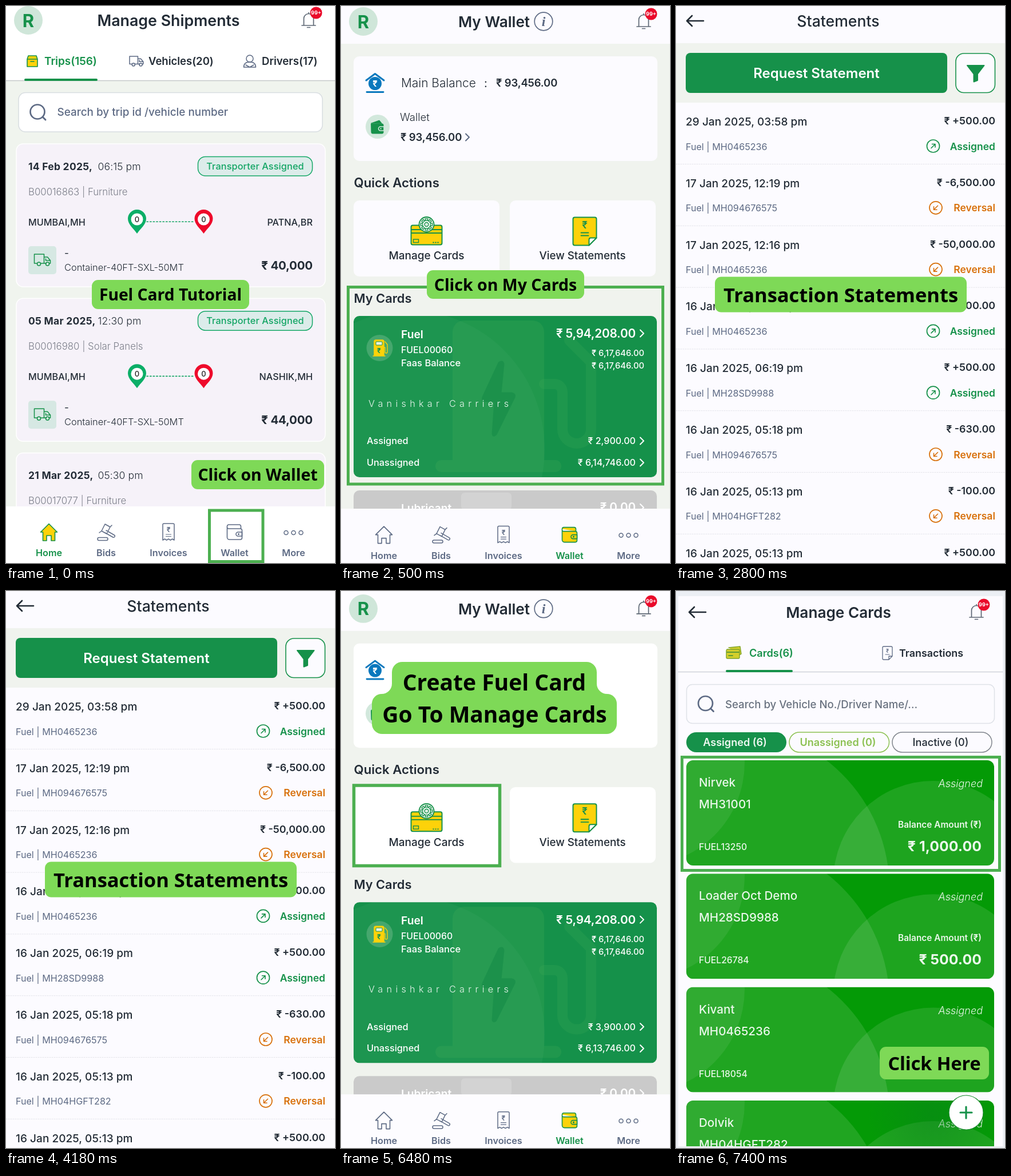
Write an HTML page that moves like this. It is 575 px wide and 974 px high and loops after 8000 ms.

```html
<!DOCTYPE html>
<html lang="en">
<head>
<meta charset="utf-8">
<title>Fuel card tutorial</title>
<style>
  html, body { margin: 0; width: 100%; height: 100%; overflow: hidden; background: #fff; }
  svg { display: block; width: 575px; height: 974px; font-family: Inter, sans-serif; }
  .scene { opacity: 0; }
  .tag { font-family: "Noto Sans", sans-serif; font-weight: 700; }
</style>
</head>
<body>
<svg id="stage" viewBox="0 0 575 974" xmlns="http://www.w3.org/2000/svg"></svg>
<script>
const INK = '#232c36', GREEN = '#16914a', SLATE = '#5d6a84', LIME = '#7ed957';
const FRAME = '#4caf50', SAND = '#f0f3ee', PAPER = '#fcfbff', YELLOW = '#fdd20a';

// Drawing helpers: each returns SVG markup.
const text = (x, y, s, size, weight = 400, fill = INK, anchor = 'start', gap = 0, more = '') =>
  `<text x="${x}" y="${y}" font-size="${size}" font-weight="${weight}" fill="${fill}" text-anchor="${anchor}" letter-spacing="${gap}" ${more}>${s}</text>`;
const mid = (x, y, s, size, weight, fill, gap) => text(x, y, s, size, weight, fill, 'middle', gap);
const end = (x, y, s, size, weight, fill, gap) => text(x, y, s, size, weight, fill, 'end', gap);
const box = (x, y, w, h, r, fill, stroke = 'none', sw = 1.5) =>
  `<rect x="${x}" y="${y}" width="${w}" height="${h}" rx="${r}" fill="${fill}" stroke="${stroke}" stroke-width="${sw}"/>`;
const dot = (x, y, r, fill, stroke = 'none', sw = 1.5) =>
  `<circle cx="${x}" cy="${y}" r="${r}" fill="${fill}" stroke="${stroke}" stroke-width="${sw}"/>`;
const line = (d, stroke, sw = 1.5, fill = 'none', more = '') =>
  `<path d="${d}" fill="${fill}" stroke="${stroke}" stroke-width="${sw}" stroke-linejoin="round" stroke-linecap="round" ${more}/>`;
const group = (t, ...kids) => `<g transform="${t}">${kids.join('')}</g>`;
const move = (x, y, ...kids) => group(`translate(${x} ${y})`, ...kids);
const tagText = (x, y, s, size) => `<text class="tag" x="${x}" y="${y}" font-size="${size}" text-anchor="middle">${s}</text>`;
const tag = (x, y, w, h, s, size, base) => box(x, y, w, h, 11, LIME) + tagText(x + w / 2, base, s, size);
const outline = (x, y, w, h, sw) => box(x, y, w, h, 0, 'none', FRAME, sw);
const chevron = (x, y, color, h = 6) => line(`M${x} ${y - h}l${h} ${h}l${-h} ${h}`, color, 2);

// Shared icons
const avatar = y => dot(39, y, 25, '#cfe6d9') + mid(39, y + 11.5, 'R', 31, 700, GREEN);
const bell = (x, y) => move(x, y,
  line('M-8.5 8V-3a8.5 8.5 0 0 1 17 0V8M-12 9H12M-2.5 12.5h5M0-11.5v-2', '#5c6673', 1.7),
  dot(13, -13, 10.5, '#ea0a2a'), mid(13, -9.8, '99+', 9, 700, '#fff'));
const back = (x, y) => line(`M${x + 29} ${y}H${x}m9-9l-9 9l9 9`, INK, 2.6);
const lens = (x, y) => dot(x, y, 12.5, 'none', SLATE, 2.7) + line(`M${x + 9} ${y + 9}l5 5`, SLATE, 2.9);
const truck = (color, sw) => line('M0 0h17v16h-6M5 16H0V0M17 5h6l5 6v5h-2M17 16h4M17 5v11M20 8v3h8', color, sw) +
  dot(8, 17, 3, 'none', color, sw) + dot(23, 17, 3, 'none', color, sw);
const walletIcon = (stroke, fill) =>
  line('M-13 -10a3 3 0 0 1 3-3H8a3 3 0 0 1 3 3v4M-13-10v19a4 4 0 0 0 4 4H10a3 3 0 0 0 3-3V-3a3 3 0 0 0-3-3H-10a3 3 0 0 1-3-4', stroke, 1.6, fill) +
  line('M13 0H6a3.5 3.5 0 0 0 0 7h7z', stroke, 1.6, fill) + dot(7, 3.5, .8, stroke, stroke);
const sheet = (x, y) => move(x, y,
  line('M3 0H38a3 3 0 0 1 3 3V36L28 49H3a3 3 0 0 1-3-3V3a3 3 0 0 1 3-3z', GREEN, 2, YELLOW),
  line('M41 36H31a3 3 0 0 0-3 3v10z', GREEN, 2, '#fff'),
  mid(20.5, 19, '₹', 17, 600, GREEN), line('M14 27h13M14 32h13', GREEN, 1.8));

function nav(dy, top, active, fill) {
  const tone = i => i === active ? GREEN : SLATE;
  const names = [[75, 'Home'], [175, 'Bids'], [284, 'Invoices'], [399.5, 'Wallet'], [502.5, 'More']];
  return box(0, top, 575, 110, 0, fill) + move(0, dy,
    line('M60.5 920L75 905.5L89.5 920H85.5V935H79V926h-8v9H64.5V920z', tone(0), 1.6, active === 0 ? YELLOW : 'none'),
    line('M173 906l9 5l-6 12l-9-5zM175 917l14 8a2 2 0 0 1-2 4l-14-8M167 918l-4 3M182 911l3-3', SLATE, 1.5),
    box(160, 929.5, 18, 5, 2.5, 'none', SLATE, 1.5),
    line('M274 934V907a2 2 0 0 1 2-2h16a2 2 0 0 1 2 2v27l-3.3-2l-3.3 2l-3.4-2l-3.3 2l-3.3-2z', SLATE, 1.5),
    mid(284, 920, '₹', 12, 600, SLATE), line('M279.5 924h9M279.5 927.5h9', SLATE, 1.2),
    move(399.5, 920, walletIcon(tone(3), active === 3 ? YELLOW : 'none')),
    ...[489.5, 502.5, 515.5].map(x => dot(x, 921, 3.5, 'none', SLATE, 1.5)),
    ...names.map(([x, s], i) => mid(x, 962, s, 16.2, 600, tone(i))));
}

// Shipments
const pin = (x, color) => move(x, 373,
  line('M0 25C-6 16-16 9-16-1a16 16 0 0 1 32 0C16 9 6 16 0 25z', 'none', 0, color),
  dot(0, 0, 10.5, '#fff'), mid(0, 4.6, '0', 13, 500, '#222'));
const trip = (i, day, time, load, to, price) => move(0, i * 270.2,
  box(18, 241, 540, 250, 12, '#f6f2f9', '#fff'),
  text(39, 286.5, day, 17.4, 700, INK, 'start', .3), text(160.5, 286.5, time, 17.6, 300, INK, 'start', .1),
  text(39, 331, load, 16.8, 300, '#7b7e89'),
  to ? box(335.5, 263.5, 200, 33.5, 13, '#dcecea', '#17a868') + mid(435.5, 286.2, 'Transporter Assigned', 16.3, 500, '#12a564', .1) +
    text(39, 384, 'MUMBAI,MH', 16.2, 500) + end(536, 384, to, 16.2, 500) +
    line('M246 377.2H330', '#12a564', 1.6, 'none', 'stroke-dasharray="2.4 3.2" stroke-linecap="butt"') +
    pin(229, '#0bae67') + pin(345.5, '#ee0a2b') +
    box(39, 420, 49, 49, 5, '#d6e8e3') + move(49.5, 434, truck(GREEN, 1.5)) +
    text(102, 438, '-', 17, 400) + text(102, 462.5, 'Container-40FT-SXL-50MT', 16.4, 300) +
    end(536, 460.5, price, 20.5, 700, INK, -.2) : '');

const shipments = () => [
  box(0, 0, 575, 974, 0, '#f0f4ee'), box(0, 0, 575, 130, 0, '#fff'), line('M0 130.5H575', '#c5cac9', 1.3),
  avatar(25), mid(284, 35, 'Manage Shipments', 26.8, 600), bell(529, 25),
  line('M37 93l2-6h14l2 6zM37 93h18v13H37zM43 97h6', GREEN, 1.6, YELLOW),
  text(67, 103, 'Trips(156)', 18.9, 600, GREEN),
  move(216, 88, group('scale(.85)', truck(SLATE, 1.8))),
  text(249, 103, 'Vehicles(20)', 18.5, 600),
  dot(426, 92, 6, 'none', SLATE) + line('M415.5 107c0-6 4-9 10.5-9s10.5 3 10.5 9zM419 103l7 4l7-4', SLATE),
  text(447, 103, 'Drivers(17)', 18.6, 600),
  box(32, 127, 128, 4, 2, GREEN),
  box(22, 151.5, 531, 68.5, 12, '#fff', '#d8dde1'), lens(55, 185),
  text(89.5, 192, 'Search by trip id /vehicle number', 18.9, 500, SLATE),
  trip(0, '14 Feb 2025,', '06:15 pm', 'B00016863 | Furniture', 'PATNA,BR', '₹ 40,000'),
  trip(1, '05 Mar 2025,', '12:30 pm', 'B00016980 | Solar Panels', 'NASHIK,MH', '₹ 44,000'),
  trip(2, '21 Mar 2025,', '05:30 pm', 'B00017077 | Furniture'),
  tag(150, 479, 275, 51, 'Fuel Card Tutorial', 28.2, 515), tag(324, 794, 232, 51, 'Click on Wallet', 28.4, 830),
  nav(0, 875, 0, '#fff'), outline(355.5, 882, 93.5, 89.5, 5)];

// Wallet
const gear = Array.from({ length: 8 }, (_, i) => `<rect x="-2" y="-10" width="4" height="5" fill="#fff" stroke="${GREEN}" stroke-width="1.3" transform="rotate(${i * 45})"/>`).join('');
const manageTile = () =>
  box(122.5, 383.5, 54, 34, 3, YELLOW, GREEN, 2) + line('M123 391h53M123 397h53', GREEN, 1.8) +
  box(126.5, 408, 9, 5.5, 0, 'none', GREEN, 1.4) + line('M161 413.5h12', GREEN, 1.8, 'none', 'stroke-dasharray="1 3"') +
  move(149.5, 382, dot(0, 0, 13, '#d9ecdf', GREEN, 1.8), gear, dot(0, 0, 7, '#fff', GREEN, 1.4), dot(0, 0, 3.5, '#d9ecdf', GREEN, 1.4)) +
  mid(149.5, 443, 'Manage Cards', 19, 500);
const pump = () => line('M58 611V587a3 3 0 0 1 3-3h11a3 3 0 0 1 3 3v24zM56 612h21', YELLOW, 1.5, YELLOW) +
  box(61, 587, 11, 6, 1, '#e9f3df', GREEN, 1) + mid(66.5, 607, '₹', 12, 700, GREEN) +
  line('M75 597h2v8a2 2 0 0 0 4 0v-13l-4-5', YELLOW, 1.3);
const fuelCard = (used, left) => [
  box(22, 542, 530, 282, 10, '#15914a'),
  `<g clip-path="url(#fuel)">`,
  `<ellipse cx="120" cy="775" rx="236" ry="242" fill="#fff" opacity=".035"/>`,
  `<g fill="#4fb35c" opacity=".2"><path d="M195 796V570a20 20 0 0 1 20-20H335a20 20 0 0 1 20 20V796z"/><rect x="165" y="794" width="220" height="21" rx="10"/></g>`,
  line('M355 661h18a14 14 0 0 1 14 14v65a24 24 0 0 0 50 0V623L399 585', '#4fb35c', 18, 'none', 'opacity=".17"'),
  line('M276 624L248 684q-2 7 5 7H269L265 748q1 6 6 1L303 684q2-6-5-7H279L284 626q-2-7-8-2z', '#0f8744', 3, '#0f8744', 'opacity=".45"'), '</g>',
  dot(67.5, 598, 23, '#45a76d'), pump(),
  text(105, 581, 'Fuel', 19.2, 600, '#fff'), text(105, 606.5, 'FUEL00060', 15.8, 500, '#fff'),
  text(105, 630, 'Faas Balance', 16.5, 500, '#fff'),
  end(515, 580, '₹ 5,94,208.00', 20.8, 600, '#fff', -.2), chevron(523, 572.5, '#fff'),
  end(530, 612, '₹ 6,17,646.00', 14.8, 500, '#fff'), end(530, 634, '₹ 6,17,646.00', 14.8, 500, '#fff'),
  text(48, 700.5, 'Vanishkar Carriers', 16.2, 300, '#e9f6ee', 'start', 6.3),
  text(45, 766, 'Assigned', 16.3, 500, '#fff'), text(45, 804, 'Unassigned', 16.3, 500, '#fff'),
  end(515, 766, used, 16.1, 500, '#fff'), end(515, 804, left, 16.1, 500, '#fff'),
  chevron(523, 760.5, '#fff'), chevron(523, 798.5, '#fff')].join('');

const wallet = (used, left, head, panel) => [
  box(0, -5, 575, 990, 0, SAND), box(0, -5, 575, 71, 0, head),
  avatar(27), text(205, 37, 'My Wallet', 26.2, 600), bell(529, 27),
  dot(354, 27, 15.8, 'none', SLATE, 1.7),
  text(354, 35, 'i', 24, 700, SLATE, 'middle', 0, 'font-style="italic" font-family="Liberation Serif, serif"'),
  box(22, 88, 531, 183, 10, panel),
  line('M44 130L59.5 118.5L75 130', '#0a78bd', 3), dot(59.5, 135.5, 11.5, '#0a78bd'),
  mid(59.5, 141, '₹', 15, 700, '#fff'), line('M45 150.5H74', '#0a78bd', 2.8),
  text(105, 142, 'Main Balance', 20.9, 300), text(250, 142, ':', 20, 400), text(271, 141, '₹ 93,456.00', 18.5, 600, INK, 'start', -.15),
  dot(64, 211, 21, '#d2e8dc'),
  line('M53 205l14-5l4 5zM53 206h19a2 2 0 0 1 2 2v13a2 2 0 0 1-2 2H55a2 2 0 0 1-2-2z', GREEN, 1, GREEN),
  line('M75 211h-6a3.5 3.5 0 0 0 0 7h6z', '#d2e8dc', 1.5, GREEN), dot(69.5, 214.5, 1, '#fff'),
  text(103, 200.5, 'Wallet', 18.4, 300), text(104, 236, '₹ 93,456.00', 18.5, 600, INK, 'start', -.15), chevron(218, 229.5, SLATE),
  text(22.5, 317, 'Quick Actions', 22.2, 600),
  box(22, 340, 255, 133, 10, panel), box(295, 340, 255, 133, 10, panel),
  manageTile(), sheet(405.5, 369.5), mid(422, 443, 'View Statements', 18.8, 500),
  text(22.5, 519, 'My Cards', 21.8, 600),
  fuelCard(used, left),
  box(22, 847, 530, 60, 10, '#cacaca'), box(210, 851, 88, 30, 6, '#d3d3d3'),
  text(105, 884.5, 'Lubricant', 19.2, 600, '#fff'), end(515, 883.5, '₹ 0.00', 20.8, 600, '#fff', -.2), chevron(523, 877, '#fff'),
  nav(4.6, 879, 3, head)].join('');

const cards = () => [wallet('₹ 2,900.00', '₹ 6,14,746.00', PAPER, PAPER),
  outline(12.5, 491.5, 550, 344.5, 5), tag(150, 462, 275, 50, 'Click on My Cards', 28.5, 497.5)];

const create = () => [
  group('translate(0 4) scale(1 .9968)', wallet('₹ 3,900.00', '₹ 6,13,746.00', '#fdfcff', '#fff')),
  box(22.5, 340, 255, 140.5, 0, '#fff', FRAME, 5.5), move(0, 2.8, manageTile()),
  line('M107 124H429a18 18 0 0 1 18 18V162a18 18 0 0 0 18 18a17 17 0 0 1 17 17V232a18 18 0 0 1-18 18H72a18 18 0 0 1-18-18V197a17 17 0 0 1 17-17a18 18 0 0 0 18-18V142a18 18 0 0 1 18-18z', 'none', 0, LIME),
  tagText(268, 174, 'Create Fuel Card', 39), tagText(268.5, 230, 'Go To Manage Cards', 38.9)];

// Statements
const ROWS = [
  ['29 Jan 2025, 03:58 pm', 'MH0465236', '+500.00'], ['17 Jan 2025, 12:19 pm', 'MH094676575', '-6,500.00'],
  ['17 Jan 2025, 12:16 pm', 'MH0465236', '-50,000.00'], ['16 Jan 2025, 06:24 pm', 'MH0465236', '+500.00'],
  ['16 Jan 2025, 06:19 pm', 'MH28SD9988', '+500.00'], ['16 Jan 2025, 05:18 pm', 'MH094676575', '-630.00'],
  ['16 Jan 2025, 05:13 pm', 'MH04HGFT282', '-100.00'], ['16 Jan 2025, 05:13 pm', 'MH0465236', '+500.00']];
const entry = ([date, plate, sum], i) => {
  const plus = sum[0] === '+', color = plus ? GREEN : '#d8710c', x = plus ? 449.5 : 454;
  return move(0, i * 107.8,
    text(17, 209, date, 19, 500, INK, 'start', .05), text(17, 251.5, 'Fuel | ' + plate, 16.1, 400, SLATE),
    end(558, 207, '₹ ' + sum, 17.9, 600),
    dot(x, 245, 11, 'none', color, 1.7),
    group(`translate(${x} 245) rotate(${plus ? 0 : 180})`, line('M-3.5 3.5L3.5-3.5M-2-3.5h5.5V2', color, 1.6)),
    end(558, 251.5, plus ? 'Assigned' : 'Reversal', 17.5, 600, color),
    line('M0 276.5H575', '#e4e4ea', 1, 'none', 'stroke-dasharray="2 2"'));
};
const statements = () => [
  box(0, 0, 575, 974, 0, PAPER), box(0, 65, 575, 104, 0, SAND),
  back(19, 26), mid(283.5, 35.5, 'Statements', 26.6, 500),
  box(17, 82, 457, 70, 8, GREEN), mid(245.5, 126, 'Request Statement', 24, 600, '#fff'),
  box(489, 83, 68.5, 68.5, 14, PAPER, GREEN, 1.6),
  line('M509 104H538.5L527 119V130L520.5 132.5V119z', GREEN, 2, GREEN),
  ROWS.map(entry).join(''), tag(68, 473.5, 440, 62, 'Transaction Statements', 34.5, 518)];

// Manage cards
const DRIVERS = [['Nirvek', 'MH31001', 'FUEL13250', '₹ 1,000.00'], ['Loader Oct Demo', 'MH28SD9988', 'FUEL26784', '₹ 500.00'],
  ['Kivant', 'MH0465236', 'FUEL18054'], ['Dolvik', 'MH04HGFT282', '']];
const MIST = '#eaf7ea';
const arc = (x, y, r, alpha) => `<circle cx="${x}" cy="${y}" r="${r}" fill="#fff" opacity="${alpha}"/>`;
const driver = ([name, plate, id, sum], i) => move(0, i * 198.3,
  '<g clip-path="url(#driver)">', box(18, 296, 538, 184, 0, '#049a06'),
  arc(90, 520, 283, .11), arc(450, 507, 175, .1), arc(-60, 300, 180, .07), '</g>',
  text(40, 342, name, 20.6, 500, MIST), text(40, 380, plate, 20.6, 500, MIST), text(40, 453, id, 15.7, 500, MIST),
  text(536, 343, 'Assigned', 18, 300, MIST, 'end', 0, 'font-style="italic"'),
  sum ? end(534, 413.5, 'Balance Amount (₹)', 15.4, 600, MIST) + end(534, 455, sum, 24.9, 700, MIST) : '');
const manage = () => [
  box(0, 0, 575, 974, 0, '#eceff4'), box(4, 9, 567, 962, 0, PAPER),
  back(23, 37), mid(284, 46.5, 'Manage Cards', 26.2, 600), bell(525, 37),
  line('M92 99l20-2l2 13l-3 2M89 102h20a2 2 0 0 1 2 2v12a2 2 0 0 1-2 2H90a2 2 0 0 1-2-2v-12z', '#7fa32a', 1.4, '#d3cf2b'),
  line('M89 107h21M92 113h7', '#5f9a35', 1.8),
  text(128, 114.5, 'Cards(6)', 18.1, 600, GREEN),
  line('M363 97h13a2 2 0 0 1 2 2v15l-6 6h-9a2 2 0 0 1-2-2V99a2 2 0 0 1 2-2zM378 114h-6v6', SLATE, 1.3),
  mid(369.5, 107.5, '₹', 9, 600, SLATE), line('M366 111h7', SLATE, 1.2),
  text(390, 114.5, 'Transactions', 17.9, 600),
  line('M4 141.5H571', '#cfd2d8', 1.4), box(87, 138, 117, 4, 2, GREEN),
  box(18.5, 163.5, 538, 68, 10, PAPER, '#dfe2e8'), lens(51.5, 196.5),
  text(86, 204.5, 'Search by Vehicle No./Driver Name/…', 18.6, 500, '#69727f'),
  box(18, 247, 175, 35, 17.5, GREEN), mid(103, 271, 'Assigned (6)', 18.1, 600, '#eef8f1'),
  box(198, 247, 174.5, 35, 17.5, PAPER, '#8cc152'), mid(283, 271, 'Unassigned (0)', 18, 600, '#8cc152'),
  box(378, 247, 174, 35, 17.5, PAPER, '#80858d'), mid(462.5, 271, 'Inactive (0)', 18.1, 500),
  '<g clip-path="url(#screen)">', DRIVERS.map(driver).join(''),
  '<g clip-path="url(#last)">', dot(450, 915, 115, 'url(#shade)'), '</g></g>',
  outline(10.5, 290.5, 555, 198, 5),
  box(356, 797, 191, 57, 11, LIME), tagText(451.5, 838, 'Click Here', 32.3),
  dot(507, 912, 30, '#fff', '#1a8c2e', 1.2), line('M497 912h20M507 902v20', GREEN, 3.2)];

const clip = (id, ...r) => `<clipPath id="${id}">${box(...r, '#000')}</clipPath>`;
const shade = '<radialGradient id="shade"><stop stop-color="#0b7d20" stop-opacity=".4"/><stop offset="1" stop-color="#0b7d20" stop-opacity="0"/></radialGradient>';
const SCENES = [[shipments, 0], [cards, 500], [statements, 2800], [create, 5100], [manage, 7400]];
const LOOP = 8000;
const stage = document.getElementById('stage');
stage.innerHTML = `<defs>${shade}${clip('fuel', 22, 542, 530, 282, 10)}${clip('driver', 18, 296, 538, 184, 12)}` +
  `${clip('last', 18, 891, 538, 184, 12)}${clip('screen', 4, 9, 567, 962, 0)}</defs>` +
  SCENES.map(([draw]) => `<g class="scene">${draw().join('')}</g>`).join('');

// Hard cuts: each scene is shown from its start to the next one's start.
stage.querySelectorAll('.scene').forEach((el, i) => {
  const from = SCENES[i][1] / LOOP, to = (SCENES[i + 1]?.[1] ?? LOOP) / LOOP;
  const steps = [{ opacity: 1, offset: from }, { opacity: to < 1 ? 0 : 1, offset: to }];
  if (from > 0) steps.unshift({ opacity: 0, offset: 0 });
  if (to < 1) steps.push({ opacity: 0, offset: 1 });
  el.animate(steps.map(s => ({ ...s, easing: 'step-end' })), { duration: LOOP, iterations: Infinity });
});
</script>
</body>
</html>
```
